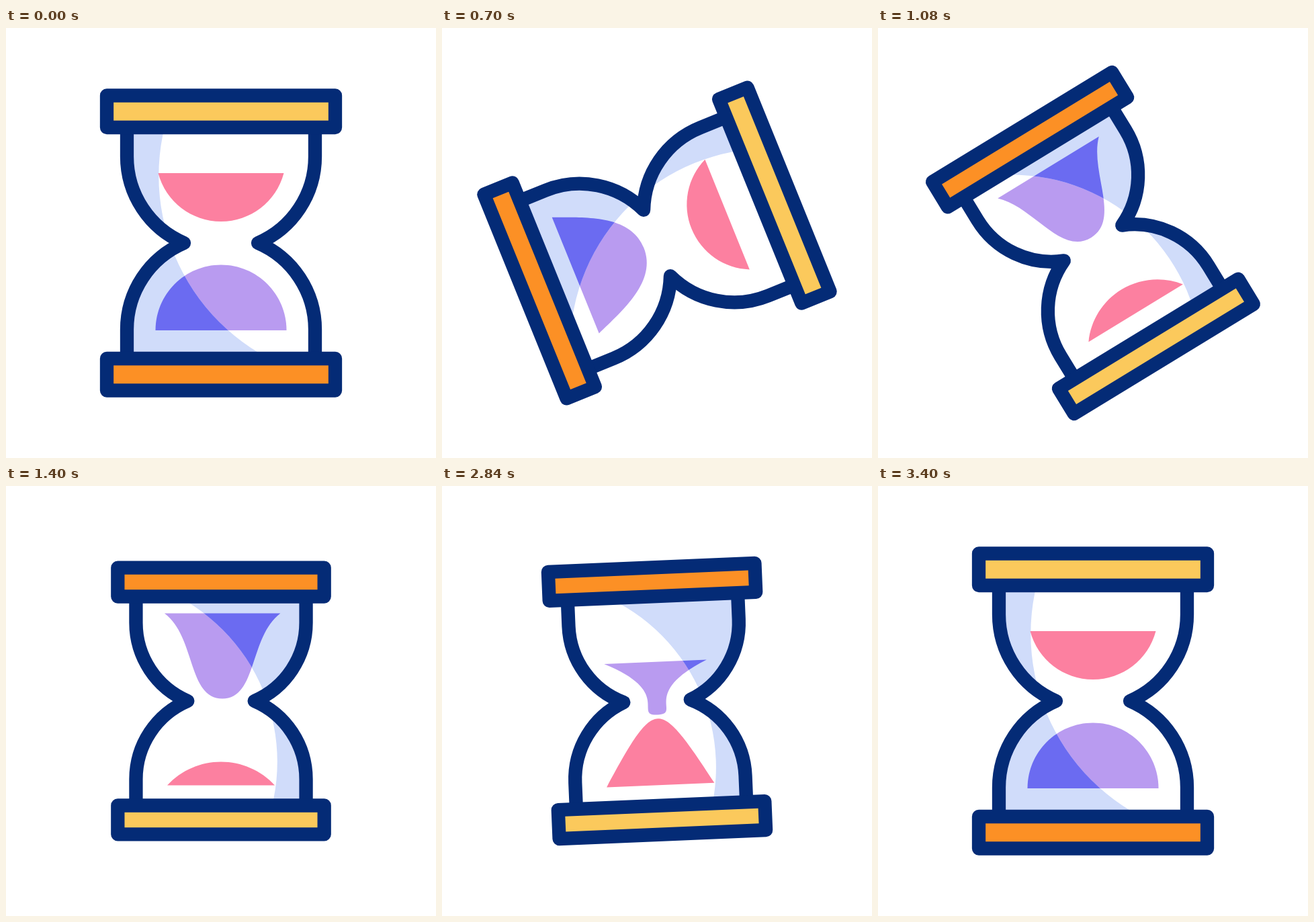
An HTML page with a canvas for the animation above (3.6 s loop, 640 by 640 pixels).

```html
<!DOCTYPE html>
<html lang="en">
<head>
<meta charset="utf-8">
<title>Hourglass</title>
<style>
  html, body { margin: 0; width: 100%; height: 100%; overflow: hidden; background: #fff; }
  canvas { display: block; width: 640px; height: 640px; }
</style>
</head>
<body>
<canvas id="stage" width="640" height="640"></canvas>
<script>
const ctx = document.getElementById('stage').getContext('2d');
const LOOP = 3600, STROKE = 20.3;
const NAVY = '#042b76', YELLOW = '#fbc95c', ORANGE = '#fc9025', PINK = '#fc80a0',
      PURPLE = '#b99bf0', BLUE = '#6b6bf1', SHADE = '#d0dcfa', SPARK = '#fdcb52';

// Eased progress from 0 to 1 between two times.
function ramp(time, from, to) {
  const t = Math.min(1, Math.max(0, (time - from) / (to - from)));
  return t * t * (3 - 2 * t);
}

// A sand pose: half width, base height, pull of the side (x, y), nose width, tip height.
const pose = (w, base, pullX, pullY, nose, tip) => ({ w, base, pullX, pullY, nose, tip });

// A pose whose outline is a circular arc.
function cap(w, base, tip) {
  const phi = 2 * Math.atan(Math.abs(tip - base) / w);
  const k = 4 / 3 * Math.tan(phi / 4) * w / Math.sin(phi);
  const up = Math.sign(tip - base);
  return pose(w, base, w - k * Math.cos(phi), base + up * k * Math.sin(phi), k, tip);
}

function mix(a, b, k) {
  const out = {};
  for (const key in a) out[key] = a[key] + (b[key] - a[key]) * k;
  return out;
}

const purpleFull = cap(97.5, 130, 32.5);
const purpleSteps = [
  [pose(95.4, 144.4, 44, 106, 57.5, 3.9), 200, 1400],
  [pose(91.8, 75.2, -9, 44, 40, -64.2), 1400, 2200],
  [pose(84.2, 63.5, -30, 12.6, 41, -23.4), 2200, 2800],
  [purpleFull, 2800, 3400]
];

const pinkFull = cap(93.5, -104, -32);
const pinkSteps = [
  [cap(88.5, -138.8, -100.1), 200, 1400],
  [pose(88.5, -138.8, 42, -60, 20, -29), 1600, 2800],
  [pinkFull, 2800, 3400]
];

const poseAt = (first, steps, time) =>
  steps.reduce((p, [next, from, to]) => mix(p, next, ramp(time, from, to)), first);

function sandPath(p, dx) {
  const path = new Path2D();
  path.moveTo(dx + p.w, p.base);
  path.bezierCurveTo(dx + p.pullX, p.pullY, dx + p.nose, p.tip, dx, p.tip);
  path.bezierCurveTo(dx - p.nose, p.tip, dx - p.pullX, p.pullY, dx - p.w, p.base);
  path.closePath();
  return path;
}

// Each wall is two arcs that meet at the neck.
const R = 140, NECK = 55, END = 172;
const bend = Math.acos(NECK / R), centreY = R * Math.sin(bend);

function addWall(path, side) {
  const left = side < 0, out = left ? Math.PI : 0, turn = side * bend;
  path.moveTo(side * R, -END);
  path.arc(0, -centreY, R, out, out + turn, left);
  path.arc(0, centreY, R, out - turn, out, left);
  path.lineTo(side * R, END);
}

const walls = new Path2D(), inside = new Path2D();
for (const side of [-1, 1]) {
  addWall(walls, side);
  addWall(inside, side);
  inside.lineTo(0, END);
  inside.lineTo(0, -END);
  inside.closePath();
}

// The shaded side is everything outside one large circle.
const shade = new Path2D();
shade.rect(-200, -200, 400, 400);
shade.moveTo(522.7, -100);
shade.arc(215, -100, 307.7, 0, 2 * Math.PI);

function fill(path, color) {
  ctx.fillStyle = color;
  ctx.fill(path);
}

function bar(y, color) {
  ctx.fillStyle = color;
  ctx.fillRect(-170, y, 340, 47.5);
  ctx.strokeRect(-170, y, 340, 47.5);
}

function sparks(alpha) {
  ctx.globalAlpha = alpha;
  ctx.strokeStyle = SPARK;
  ctx.lineWidth = 20.6;
  ctx.beginPath();
  for (const side of [-1, 1])
    for (const [x, y] of [[198.5, -103.4], [236.9, 12]]) {
      ctx.moveTo(side * x, y);
      ctx.lineTo(side * x, y + 28.4);
    }
  ctx.stroke();
  ctx.globalAlpha = 1;
}

function draw(time) {
  const flip = ramp(time, 200, 1400) - ramp(time, 2800, 3400);
  const scale = 1 - 0.096 * flip;
  const shift = -2.4 * (ramp(time, 200, 1400) - ramp(time, 1400, 2800));

  ctx.setTransform(1, 0, 0, 1, 320, 320);
  ctx.fillStyle = '#fff';
  ctx.fillRect(-320, -320, 640, 640);
  ctx.lineCap = ctx.lineJoin = 'round';
  sparks(ramp(time, 1800, 2200) - ramp(time, 2200, 2600));

  ctx.rotate(flip * Math.PI);
  ctx.scale(scale, scale);

  const purple = sandPath(poseAt(purpleFull, purpleSteps, time), shift);
  fill(purple, PURPLE);
  ctx.save();
  ctx.clip(inside);
  ctx.clip(shade, 'evenodd');
  fill(inside, SHADE);
  fill(purple, BLUE);
  ctx.restore();
  fill(sandPath(poseAt(pinkFull, pinkSteps, time), 0), PINK);

  // The outline keeps its weight while the glass shrinks.
  ctx.strokeStyle = NAVY;
  ctx.lineWidth = STROKE / scale;
  ctx.stroke(walls);
  bar(-219.5, YELLOW);
  bar(END, ORANGE);
}

const start = performance.now();
function tick() {
  draw((performance.now() - start) % LOOP);
  requestAnimationFrame(tick);
}
tick();
</script>
</body>
</html>
```
